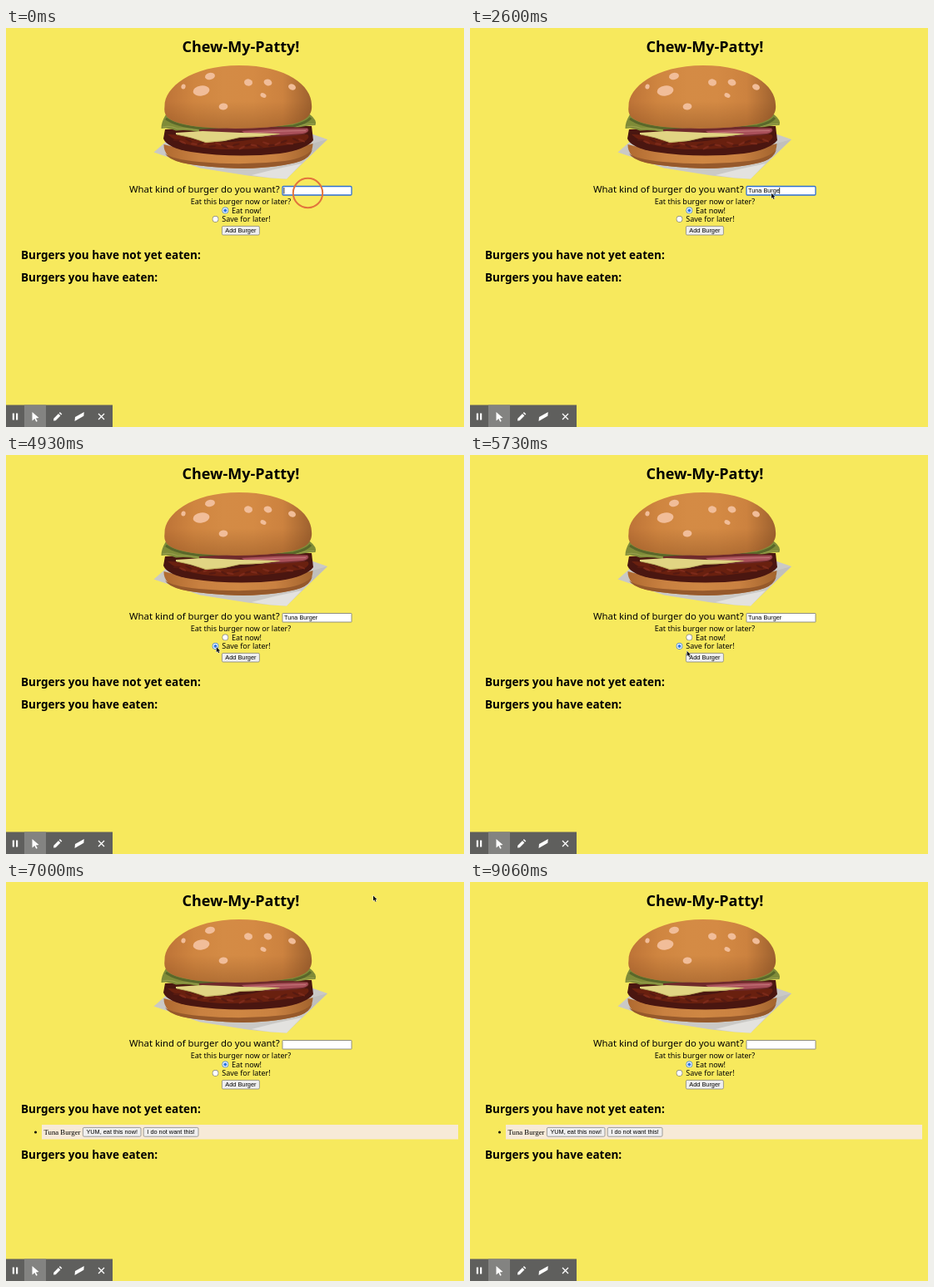
Write an HTML page with a canvas that moves like this. It is 550x480 px and loops after 9130 ms.

```html
<!DOCTYPE html>
<html lang="en">
<head>
<meta charset="utf-8">
<title>Burger list</title>
<style>
html, body { margin: 0; width: 100%; height: 100%; overflow: hidden; background: #f7e95d; }
canvas { display: block; width: 550px; height: 480px; }
</style>
</head>
<body>
<canvas id="stage"></canvas>
<script>
const LOOP = 9130, W = 550, H = 480;
const ORDER = "Tuna Burger";
const KEYS = [1060, 1260, 1330, 1530, 1660, 1860, 2000, 2200, 2400, 2600, 2800];
const PICK_LATER = 4860, RELOAD = 6330;
const SANS = '"Noto Sans", "Open Sans", sans-serif';
const UI = '"Liberation Sans", Arial, sans-serif';
const SERIF = '"Liberation Serif", "Times New Roman", serif';

const canvas = document.getElementById("stage");
const dpr = window.devicePixelRatio || 1;
canvas.width = W * dpr;
canvas.height = H * dpr;
const c = canvas.getContext("2d");

function text(s, x, y, font, align = "left", color = "#000") {
  c.font = font;
  c.textAlign = align;
  c.fillStyle = color;
  c.fillText(s, x, y);
}

function shape(d, fill) {
  c.fillStyle = fill;
  c.fill(new Path2D(d));
}

function line(d, color, width = 1) {
  c.strokeStyle = color;
  c.lineWidth = width;
  c.stroke(new Path2D(d));
}

function oval(x, y, rx, ry, fill, turn = 0) {
  c.beginPath();
  c.ellipse(x, y, rx, ry, turn, 0, 7);
  c.fillStyle = fill;
  c.fill();
}

function box(x, y, w, h, r, fill, stroke, width = 0.7) {
  c.beginPath();
  c.roundRect(x, y, w, h, r);
  c.fillStyle = fill;
  c.fill();
  c.strokeStyle = stroke;
  c.lineWidth = width;
  c.stroke();
}

function blend(x0, y0, x1, y1, ...stops) {
  const g = c.createLinearGradient(x0, y0, x1, y1);
  stops.forEach((s, i) => g.addColorStop(i / (stops.length - 1), s));
  return g;
}

function paper() {
  shape("M177.5 149.5 L194 135 L366 127 L386 134 L337 181.5 Q318 181 290 177.5 L233 168.5 Z", "#cac9c6");
  shape("M295 177 Q325 169 355 163 L337 181.5 Q318 181 295 177Z", "#e3e2df");
  shape("M368 139 L386 134 L365 154 L352 161Z", "#c0bfbc");
}

function lowerBun() {
  const d = "M189.5 140 Q189 156 211 162 Q240 168 285 169 Q330 168 354 160 Q368 154 368.5 139 L350 144 Q280 160 205 144Z";
  shape(d, blend(189, 0, 368, 0, "#b06a30", "#c98141", "#cf8743", "#c98141", "#a3642e"));
  shape("M191 151 Q200 158 232 161 Q285 166 335 160 Q360 156 368 146 Q365 156 354 160 Q330 168 285 169 Q240 168 211 162 Q195 158 191 151Z", "#96592b");
}

function patty() {
  shape("M191 122 Q280 116 367 118 L369 135 Q361 146 329 151 Q275 157 222 149 Q193 144 189 133Z", "#4a1610");
  shape("M194 128 Q206 127 225 134 Q265 142 310 131 L362 128 Q367 132 357 137 Q310 147 258 146 Q210 143 194 128Z", "#69200f");
  for (let i = 0; i < 22; i++) {
    const u = i / 21;
    const y = 135 + 7 * Math.sin(Math.PI * u) + 2 * Math.sin(i * 2.4);
    oval(205 + 150 * u, y, 4.5, 1.2, i % 2 ? "#7c2a1a" : "#571a11", Math.sin(i) * 0.5);
  }
}

function fillings() {
  shape("M232 122 Q320 116 362 120 Q367 124 358 128 Q330 132 284 131 Q250 129 232 126Z", "#6f2a2b");
  shape("M283 124 Q330 121 362 121 Q365 125 356 127 Q325 130 290 129Z", "#a9505a");
  line("M290 126.5 Q330 123.5 360 123.5", "#c4777a", 1.2);
  shape("M204 126 L236 124 L282 126 L330 127 Q305 132 281 131.5 L262 136 L240 138 Q222 131 204 128Z", "#e1d583");
  line("M205 128 Q222 131 240 137.5 L262 135.5 L281 131.5 Q305 131 328 127.5", "#bcae5c", 0.8);
}

function lettuce() {
  shape("M192 104 Q186 114 186.5 121 Q195 119 204 123.5 Q217 122 231 125 Q260 122 290 123 Q320 122 340 122.5 Q358 117 371.5 117 Q374 111 365 104Z", "#7f8b38");
  line("M188 119 Q197 117 206 121 Q219 120 231 123", "#9aa04c", 1.1);
  line("M345 120 Q358 115 370 115.5", "#9aa04c", 1.1);
  line("M192 109 Q205 118 232 120.5 Q290 124 345 118 Q361 114 366 108", "#59672a", 3);
}

function upperBun() {
  const dome = "M190.5 94 C190 72 222 45 280 45 C338 45 367 70 367 92 C368.5 105 360 111 346 115 C309 123 235 123 207 114 C194 110 189 105 190.5 94Z";
  shape(dome, blend(190, 0, 368, 0, "#bd7337", "#cf8540", "#d48b45", "#d48a44", "#cc823f", "#9c602e"));
  c.save();
  c.clip(new Path2D(dome));
  c.fillStyle = blend(0, 88, 0, 122, "rgba(120,65,25,0)", "rgba(120,65,25,.38)");
  c.fillRect(185, 88, 190, 36);
  c.restore();
  const seeds = [
    [245, 58, 6, 4.2, -.2], [234.5, 75.5, 10, 6, -.15], [213, 70.5, 2.6, 3, .2],
    [291, 65.5, 5, 4.2, .2], [314.5, 65.5, 5, 3.8, .3], [309, 81, 3.7, 2.6, .5],
    [343.5, 71, 4.6, 3.6, .4], [261, 94.5, 5.4, 4, -.1]
  ];
  for (const [x, y, rx, ry, turn] of seeds) oval(x, y, rx, ry, "#f1bd99", turn);
}

function burger() {
  paper();
  lowerBun();
  patty();
  lettuce();
  fillings();
  upperBun();
}

function button(label, x, y, w, h, hover) {
  box(x, y, w, h, 1.5, hover ? "#e1e1e1" : "#efefef", "#777");
  text(label, x + w / 2, y + h / 2 + 2.6, `7.35px ${UI}`, "center");
}

function radio(x, y, on, fresh) {
  const blue = fresh ? "#6d9ce5" : "#2f78e4";
  oval(x, y, 3.8, 3.8, on ? blue : "#808080");
  oval(x, y, 3.1, 3.1, "#fff");
  if (on) oval(x, y, 2, 2, blue);
}

function field(t) {
  const focus = t < PICK_LATER;
  box(332, 190.5, 83, 10.5, focus ? 1.2 : 0.5, "#fff", focus ? "#2f6fd2" : "#777", focus ? 1.3 : 0.8);
  if (t >= RELOAD) return;
  const count = KEYS.filter(k => k <= t).length;
  const typed = ORDER.slice(0, count);
  text(typed, 334, 198.3, `7.3px ${UI}`);
  const since = t - (count ? KEYS[count - 1] : 0);
  if (focus && Math.floor(since / 500) % 2 === 0) {
    c.fillRect(333.5 + c.measureText(typed).width, 192, 0.8, 7.5);
  }
}

function form(t) {
  const later = t >= PICK_LATER && t < RELOAD;
  text("What kind of burger do you want?", 148, 197.7, `11.34px ${SANS}`);
  field(t);
  text("Eat this burger now or later?", 282, 212.4, `9.06px ${SANS}`, "center");
  radio(263.3, 219.4, !later, t >= RELOAD && t < RELOAD + 100);
  text("Eat now!", 271, 222.9, `9px ${SANS}`);
  radio(251.5, 229.9, later);
  text("Save for later!", 259.3, 233.3, `9px ${SANS}`);
  button("Add Burger", 259.4, 238.4, 45, 10.6, t >= 5850 && t < 6500);
}

function lists(t) {
  const heading = `bold 13.5px ${SANS}`;
  const added = t >= RELOAD;
  text("Burgers you have not yet eaten:", 18, 278.3, heading);
  if (added) {
    c.fillStyle = "#f7ead7";
    c.fillRect(43, 292, 500, 17.5);
    oval(35.5, 301, 1.5, 1.5, "#000");
    text(ORDER, 45.5, 303.5, `8.75px ${SERIF}`);
    button("YUM, eat this now!", 92.4, 295.4, 69.6, 10.8);
    button("I do not want this!", 165.2, 295.4, 65.8, 10.8);
  }
  text("Burgers you have eaten:", 18, added ? 332.8 : 304.8, heading);
}

function toolbar() {
  c.fillStyle = "#5f5f5d";
  c.fillRect(0, 453.5, 128, 26.5);
  c.fillStyle = "#838381";
  c.fillRect(22, 453.5, 26, 26.5);
  c.fillStyle = "#fff";
  c.fillRect(7.8, 463.5, 2.2, 8);
  c.fillRect(12, 463.5, 2.2, 8);
  shape("M31.5 462 L39.5 469 L35.8 469.4 L37.8 473 L36.2 473.8 L34.4 470.1 L31.5 472.6Z", "#fff");
  shape("M57 472.5 L57.3 469.8 L63 464 L65.4 466.4 L59.7 472.2Z M63.8 463.2 L64.9 462.1 L67.3 464.5 L66.2 465.6Z", "#fff");
  shape("M83 468 L93.8 462 L93.3 466.8 L82.5 473Z", "#fff");
  line("M111 464 L118 471 M118 464 L111 471", "#fff", 1.3);
}

// Pointer stops: time, x, y.
const MOVES = [
  [0, 362, 198.7], [4330, 362, 198.7], [4760, 252.7, 231], [5600, 252.7, 231],
  [5930, 275.3, 244.5], [6500, 275.3, 244.5], [7100, 454, -1.5], [LOOP, 454, -1.5]
];

function pointer(t) {
  if (t < 860 || (t > 2930 && t < 4330) || t >= 8460) return;
  const i = MOVES.findIndex(m => m[0] > t);
  const [t0, x0, y0] = MOVES[i - 1], [t1, x1, y1] = MOVES[i];
  const u = (t - t0) / (t1 - t0), e = u * u * (3 - 2 * u);
  c.save();
  c.translate(x0 + (x1 - x0) * e, y0 + (y1 - y0) * e);
  const arrow = "M0 0 V6.2 L1.4 4.9 L2.5 7.3 L3.6 6.8 L2.6 4.6 H4.5Z";
  line(arrow, "#fff", 0.9);
  shape(arrow, "#111");
  c.restore();
}

function clickRing(t) {
  if (t >= 460) return;
  c.save();
  c.globalAlpha = Math.min(1, (460 - t) / 260);
  c.beginPath();
  c.arc(362.5, 198.5, 17.7, 0, 7);
  c.strokeStyle = "#e2743c";
  c.lineWidth = 2;
  c.stroke();
  c.restore();
}

function draw(t) {
  c.setTransform(dpr, 0, 0, dpr, 0, 0);
  c.fillStyle = "#f7e95d";
  c.fillRect(0, 0, W, H);
  text("Chew-My-Patty!", 282, 28.5, `bold 18px ${SANS}`, "center");
  burger();
  form(t);
  lists(t);
  toolbar();
  clickRing(t);
  pointer(t);
}

const start = performance.now();
function tick() {
  draw((performance.now() - start) % LOOP);
  requestAnimationFrame(tick);
}
tick();
</script>
</body>
</html>
```
